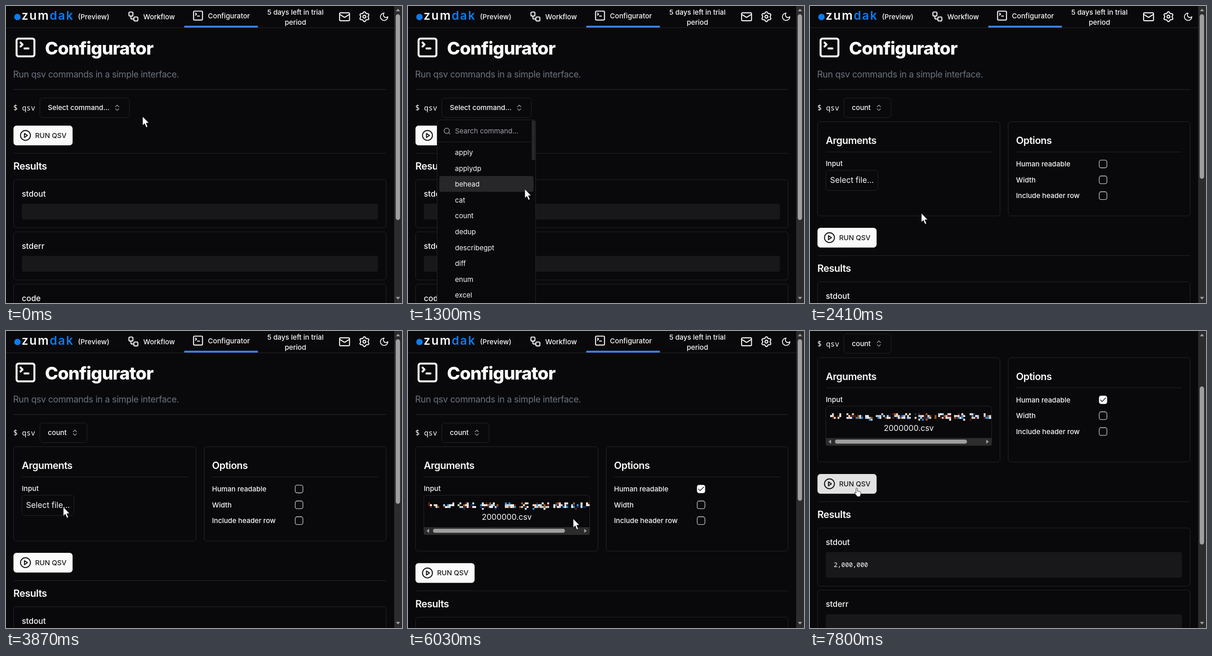
Animation, 864 px wide and 648 px high, one loop 7840 ms. Source, as an HTML page:

```html
<!DOCTYPE html>
<html lang="en">
<head>
<meta charset="utf-8">
<title>Configurator</title>
<style>
  html, body { margin: 0; width: 100%; height: 100%; overflow: hidden; background: #09090b; }
  svg { display: block; }
  text { font: 500 15.12px Inter, sans-serif; fill: #fafafa; white-space: pre; }
  .base { font-size: 17.28px; }
  .plain { font-weight: 400; }
  .head { font-size: 21.6px; font-weight: 600; letter-spacing: -.025em; }
  .mono { font-family: "Noto Sans Mono", monospace; }
  .mid { text-anchor: middle; }
  .dark { fill: #18181b; }
  .icon { fill: none; stroke: #fafafa; stroke-width: 2; stroke-linecap: round; stroke-linejoin: round; }
  .box { fill: #09090b; stroke: #27272a; }
  .none { fill: none; }
  .rule { fill: #27272a; }
  .pre { fill: #18181b; }
  .check { fill: #09090b; stroke: #fafafa; stroke-width: 1.08; }
  .bar { fill: #2c2c2c; }
  .thumb { fill: #9f9f9f; }
  .cursor { fill: #fff; stroke: #000; stroke-width: .8; stroke-linejoin: round; }
</style>
</head>
<body>
<svg width="864" height="648" viewBox="0 0 864 648">
  <defs>
    <clipPath id="fileClip"><rect x="36" y="360" width="360" height="66"/></clipPath>
    <g id="terminal"><path d="m7 11 2-2-2-2M11 13h4"/><rect x="3" y="3" width="18" height="18" rx="2"/></g>
    <path id="updown" d="m7 15 5 5 5-5M7 9l5-5 5 5"/>
  </defs>
  <rect width="864" height="648" fill="#09090b"/>

  <g id="page">
    <!-- top bar -->
    <rect class="rule" y="47" width="847" height="1"/>
    <rect x="389" y="43" width="160.500" height="4" fill="#3b82f6"/>
    <circle cx="25" cy="24" r="7" fill="#0a7cf0"/>
    <text x="34" y="30" style="font-size:26px;font-weight:600;letter-spacing:2.4px">zum<tspan fill="#0a7cf0">dak</tspan></text>
    <text x="157" y="28.500">(Preview)</text>
    <g class="icon" transform="translate(265 10) scale(1.08)">
      <rect x="3" y="3" width="8" height="8" rx="2"/><path d="M7 11v4a2 2 0 0 0 2 2h4"/><rect x="13" y="13" width="8" height="8" rx="2"/>
    </g>
    <text x="299.500" y="28.500">Workflow</text>
    <use href="#terminal" class="icon" transform="translate(406 8) scale(1.08)"/>
    <text x="440.500" y="27">Configurator</text>
    <text class="mid" x="631.500" y="19">5 days left in trial</text>
    <text class="mid" x="631.500" y="40.500">period</text>
    <g class="icon" transform="translate(725.700 10.500) scale(1.08)">
      <rect x="2" y="4" width="20" height="16" rx="2"/><path d="m22 7-8.970 5.700a1.940 1.940 0 0 1-2.060 0L2 7"/>
    </g>
    <g class="icon" transform="translate(782 23.300) scale(1.08)"><path id="gear"/><circle r="3"/></g>
    <path class="icon" transform="translate(814.200 12.700) scale(.9)" d="M12 3a6 6 0 0 0 9 9 9 9 0 1 1-9-9Z"/>

    <!-- heading -->
    <use href="#terminal" class="icon" transform="translate(16.600 64.600) scale(2.160)"/>
    <text x="85" y="105.500" style="font-size:38.9px;font-weight:800;letter-spacing:-.025em">Configurator</text>
    <text class="plain" x="15.500" y="156" style="font-size:19.44px;letter-spacing:-.02em;fill:#6b7280">Run qsv commands in a simple interface.</text>
    <rect class="rule" x="16.500" y="181.500" width="813" height="1.300"/>

    <!-- command line -->
    <text class="mono" x="16" y="228" style="font-size:15.9px">$ qsv</text>
    <rect id="select" class="box" x="73.800" y="200.800" height="42.500" rx="6.500"/>
    <text id="command" x="91.300" y="227.300"></text>
    <use id="arrows" href="#updown" class="icon" opacity=".6"/>

    <!-- arguments and options -->
    <g id="panels">
      <rect class="box panel" x="16.500" y="252.500" width="398" rx="6"/>
      <text class="head" x="34.500" y="301">Arguments</text>
      <rect class="rule" x="34.500" y="318" width="362.500" height="1"/>
      <text x="34.500" y="349">Input</text>
      <g id="noFile">
        <rect class="box" x="34.500" y="358.300" width="114" height="44.400" rx="6.500"/>
        <text class="base plain" x="43.700" y="386.200">Select file...</text>
      </g>
      <g id="file">
        <rect class="box" x="34.500" y="358.300" width="362" height="86" rx="6.500"/>
        <g clip-path="url(#fileClip)"><g id="mosaicA"></g><g id="mosaicB"></g></g>
        <text class="base plain mid" x="215.500" y="412">2000000.csv</text>
        <rect class="bar" x="35" y="428" width="361" height="16.500"/>
        <rect class="thumb" x="54.500" y="431.600" width="288" height="8.600" rx="4.300"/>
        <path class="thumb" d="M46 431.500v9l-5.500-4.500zM384.500 431.500v9l5.500-4.500z"/>
      </g>
      <rect class="box panel" x="432.500" y="252.500" width="397" rx="6"/>
      <text class="head" x="449.500" y="301">Options</text>
      <rect class="rule" x="449.500" y="318" width="362" height="1"/>
      <text x="449.500" y="350">Human readable</text>
      <text x="449.500" y="384.500">Width</text>
      <text x="449.500" y="419">Include header row</text>
      <rect id="human" class="check" x="631" y="336.300" width="16.800" height="16.800" rx="4"/>
      <path id="tick" class="icon" transform="translate(630.800 336.200) scale(.72)" style="stroke:#18181b" d="M20 6 9 17l-5-5"/>
      <rect class="check" x="631" y="370.900" width="16.800" height="16.800" rx="4"/>
      <rect class="check" x="631" y="405.400" width="16.800" height="16.800" rx="4"/>
    </g>

    <!-- run button and results -->
    <g id="lower">
      <rect id="run" x="16.300" y="261" width="129" height="43" rx="6.500"/>
      <g class="icon" transform="translate(29.500 269.500) scale(1.08)" style="stroke:#18181b"><circle cx="12" cy="12" r="10"/><path d="m10 8 6 4-6 4z"/></g>
      <text class="dark" x="63.500" y="287.800">RUN QSV</text>
      <rect class="rule" x="16.500" y="321" width="813" height="1"/>
      <text class="head" x="16" y="357">Results</text>
      <rect id="outCard" class="box" x="16.500" y="378.800" width="813" rx="6"/>
      <text class="base" x="34.500" y="415.500">stdout</text>
      <rect id="outPre" class="pre" x="34.500" y="431.300" width="777" rx="4"/>
      <text id="output" class="mono" x="51.700" y="464.300" style="font-size:13.87px">2,000,000</text>
      <g id="rest">
        <rect class="box" x="16.500" y="492.800" width="813" height="105" rx="6"/>
        <text class="base" x="34.500" y="529.500">stderr</text>
        <rect class="pre" x="34.500" y="545.300" width="777" height="34.500" rx="4"/>
        <rect class="box" x="16.500" y="606.800" width="813" height="105" rx="6"/>
        <text class="base" x="34.500" y="643.500">code</text>
      </g>
    </g>

    <!-- command list -->
    <g id="menu">
      <rect class="box" x="63.500" y="248.500" width="215" height="420" rx="6.500"/>
      <g class="icon" transform="translate(76.500 264.300) scale(.72)" opacity=".6"><circle cx="11" cy="11" r="8"/><path d="m21 21-4.300-4.300"/></g>
      <text class="plain" x="102.500" y="278.300" style="fill:#a1a1aa">Search command...</text>
      <rect class="rule" x="64" y="296" width="206" height="1"/>
      <rect id="mark" x="68.300" width="205.500" height="34.500" rx="4" fill="#27272a"/>
      <rect class="rule" x="270" y="250" width="7.500" height="86"/>
      <g id="items"></g>
    </g>
  </g>

  <!-- page scrollbar -->
  <rect class="bar" x="847" width="17" height="648"/>
  <rect id="thumb" class="thumb" x="850.300" width="9.500" rx="4.700"/>
  <path class="thumb" d="M850.500 11.500h9.500l-4.750-5.500zM850.500 634.800h9.500l-4.750 5.500z"/>

  <path id="arrow" class="cursor" d="M0 0v19.800l4.400-4.200 3.500 8.300 3.300-1.400-3.500-8.100h6.200z"/>
  <path id="hand" class="cursor" d="M-1.500 1.200a1.500 1.500 0 0 1 3 0v5l5.500 1.300q1.700.4 1.700 2.200v3q0 2-1.300 4v1.500h-7.200v-1.500q-2.800-2.600-4.800-6-.6-2.200 1.600-1.400l1.500 1.400z"/>
</svg>

<script>
const LOOP = 7840, SCROLL = 194.5, ROW = 34.55;
const PICK = 1990, FILE = 4030, CHECK = 5710, OUTPUT = 7110;
const $ = id => document.getElementById(id);
const NS = 'http://www.w3.org/2000/svg';

function add(parent, tag, attrs) {
  const el = document.createElementNS(NS, tag);
  for (const k in attrs) el.setAttribute(k, attrs[k]);
  return parent.appendChild(el);
}
const set = (id, key, value) => $(id).setAttribute(key, value);
const show = (id, on) => { $(id).style.display = on ? '' : 'none'; };
const clamp = v => Math.max(0, Math.min(1, v));
const smooth = u => u * u * (3 - 2 * u);
const out = u => 1 - (1 - u) ** 2;

// Pointer strokes: start, end, target, optional bend point and easing
const START = [298, 241];
const MOVES = [
  [40, 400, 238, 224],
  [940, 1580, 243, 452, 282.3, 307.9, out],
  [2910, 3660, 125, 384],
  [4030, 4560, 645, 342],
  [4690, 4890, 642, 343],
  [5710, 6190, 265, 372, 450, 475],
  [6510, 6930, 91, 340],
  [7620, 7800, 102, 343]
];

function pointer(t) {
  let [x, y] = START;
  for (const [t0, t1, tx, ty, bx = (x + tx) / 2, by = (y + ty) / 2, ease = smooth] of MOVES) {
    if (t < t0) break;
    const s = ease(clamp((t - t0) / (t1 - t0)));
    const mix = (a, b, c) => (1 - s) ** 2 * a + 2 * s * (1 - s) * b + s * s * c;
    x = mix(x, bx, tx);
    y = mix(y, by, ty);
  }
  return [x, y];
}

function random(seed) {
  return () => (seed = seed * 16807 % 2147483647) / 2147483647;
}

// Pixelated, unreadable file path
function mosaic(id, seed) {
  const rnd = random(seed);
  const tones = ['#fff', '#fff', '#f4dcc0', '#b4dcfa', '#a85c1c', '#15305f', '#641c10', '#3b8fd0', '#d8d8dc'];
  for (let x = 44, left = 6; x < 397; x += 4) {
    if (left-- <= 0) {
      left = 3 + Math.floor(rnd() * 7);
      x += 4 + rnd() * 8;
    }
    for (let row = 0; row < 4; row++) {
      if (rnd() < [.35, .75, .8, .1][row])
        add($(id), 'rect', { x, y: 374 + row * 4, width: 4.1, height: 4.1, fill: tones[Math.floor(rnd() * tones.length)] });
    }
  }
}

function build() {
  const gear = Array.from({ length: 72 }, (_, i) => {
    const a = i * Math.PI / 36, r = 8.7 - 1.3 * Math.cos(6 * a);
    return (r * Math.cos(a)).toFixed(2) + ' ' + (r * Math.sin(a)).toFixed(2);
  });
  set('gear', 'd', 'M' + gear.join('L') + 'z');
  'apply applydp behead cat count dedup describegpt diff enum excel'.split(' ').forEach((name, i) => {
    add($('items'), 'text', { class: 'plain', x: 102.5, y: 325.2 + i * ROW }).textContent = name;
  });
  mosaic('mosaicA', 4711);
  mosaic('mosaicB', 90210);
}

function draw(t) {
  const [x, y] = pointer(t);
  const picked = t >= PICK, hasFile = t >= FILE, checked = t >= CHECK, done = t >= OUTPUT;
  const scroll = smooth(clamp((t - 6190) / 260));
  const shift = hasFile ? 245.5 : picked ? 223 : 0;
  const py = y + SCROLL * scroll;
  const inside = (l, r, top, bottom) => x > l && x < r && py > top && py < bottom;

  set('page', 'transform', `translate(0 ${-SCROLL * scroll})`);

  const width = picked ? 103 : 195.5;
  set('select', 'width', width);
  $('select').style.fill = inside(74, 74 + width, 201, 243) ? '#27272a' : '';
  $('command').textContent = picked ? 'count' : 'Select command...';
  set('arrows', 'transform', `translate(${picked ? 141.6 : 234} 213.4) scale(.72)`);

  show('panels', picked);
  show('noFile', !hasFile);
  show('file', hasFile);
  show('mosaicA', scroll === 0);
  show('mosaicB', scroll > 0);
  document.querySelectorAll('.panel').forEach(p => p.setAttribute('height', hasFile ? 227.7 : 205.5));
  $('human').style.fill = checked ? '#fafafa' : '';
  show('tick', checked);

  set('lower', 'transform', `translate(0 ${shift})`);
  const onRun = inside(16, 145, 261 + shift, 304 + shift);
  set('run', 'fill', onRun ? '#e2e2e3' : '#fafafa');
  const grow = done ? 21.8 : 0;
  set('outCard', 'height', 105 + grow);
  set('outPre', 'height', 34.5 + grow);
  set('rest', 'transform', `translate(0 ${grow})`);
  show('output', done);

  const open = clamp((t - 570) / 120) * (1 - clamp((t - PICK) / 120));
  const zoom = .95 + .05 * open;
  show('menu', open > 0);
  set('menu', 'opacity', open);
  set('menu', 'transform', `translate(171 248) scale(${zoom}) translate(-171 -248)`);
  set('mark', 'y', 302 + ROW * Math.max(0, Math.floor((y - 302) / ROW)));

  set('thumb', 'y', 18 + (done ? 103 : 104) * scroll);
  set('thumb', 'height', done ? 345 : hasFile ? 352.5 : picked ? 359 : 449);

  const onCheck = hasFile && inside(630, 649, 336, 354);
  show('arrow', !onRun && !onCheck);
  show('hand', onRun || onCheck);
  for (const id of ['arrow', 'hand']) set(id, 'transform', `translate(${x} ${y})`);
}

build();
const begin = performance.now();
function tick() {
  draw((performance.now() - begin) % LOOP);
  requestAnimationFrame(tick);
}
tick();
</script>
</body>
</html>
```
